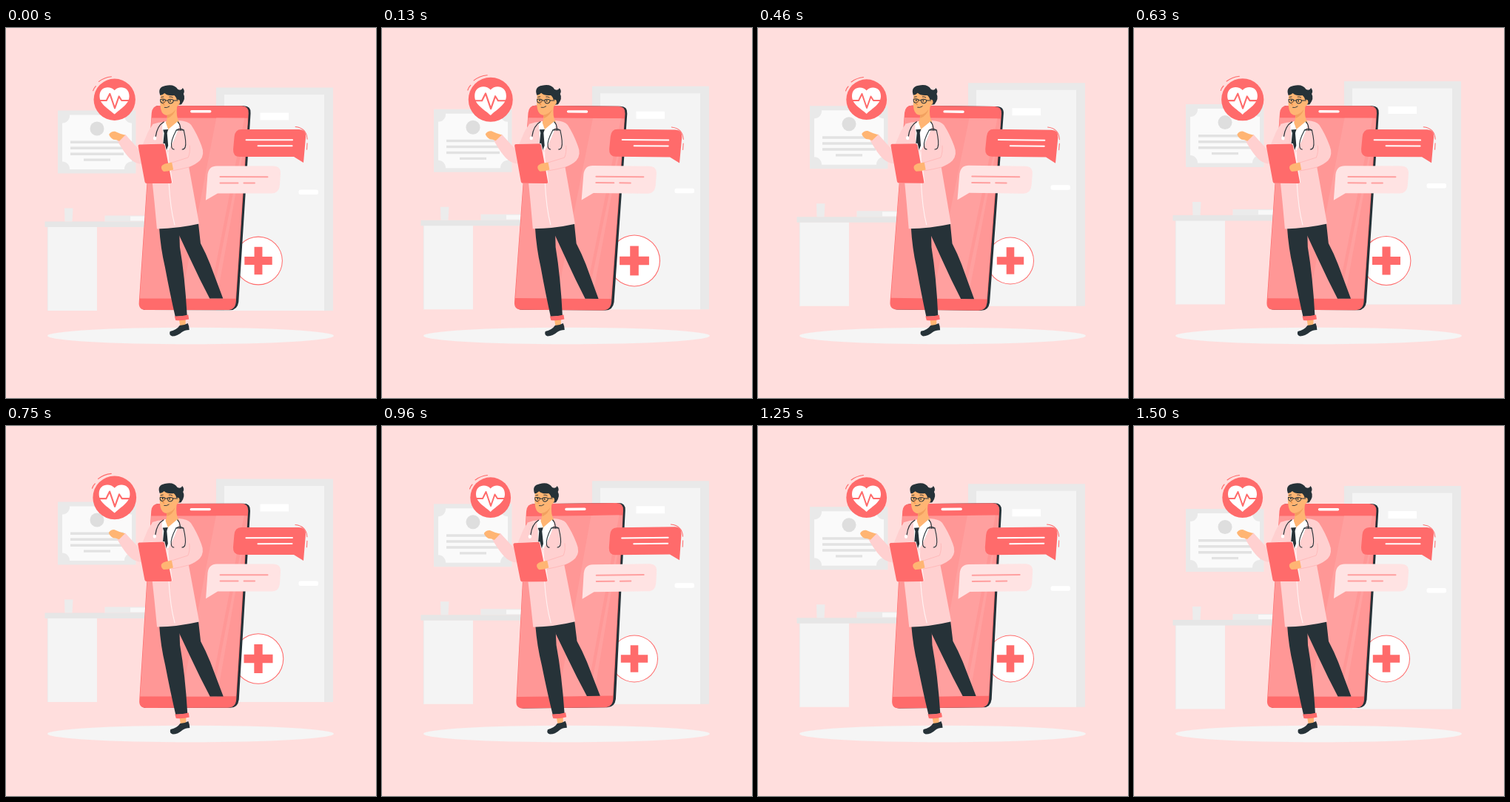
Write an HTML page with a canvas that moves like this. It is 500x500 px and loops after 1.54 s.

```html
<!DOCTYPE html>
<html lang="en">
<head>
<meta charset="utf-8">
<title>Online doctor</title>
<style>
  html, body { margin: 0; width: 100%; height: 100%; overflow: hidden; background: #ffdedd; }
  canvas { display: block; width: 100vw; height: 100vh; }
</style>
</head>
<body>
<canvas id="stage"></canvas>
<script>
const SIZE = 500, LOOP = 1540, CYCLE = 1500, STEP = 1000 / 24;
const RED = '#ff6b6b', DARK = '#263238', SKIN = '#ffb573', COAT = '#ffd0d0';
const GREY = '#e9e9e9', PALE = '#f4f4f4', WHITE = '#fff';

const canvas = document.getElementById('stage');
const ctx = canvas.getContext('2d');
const density = window.devicePixelRatio || 1;
canvas.width = canvas.height = SIZE * density;

function fill(d, color) {
  ctx.fillStyle = color;
  ctx.fill(new Path2D(d));
}

function line(d, color, width = 1) {
  ctx.strokeStyle = color;
  ctx.lineWidth = width;
  ctx.lineCap = ctx.lineJoin = 'round';
  ctx.stroke(new Path2D(d));
}

function rect(x, y, w, h, color, radius = 0) {
  ctx.fillStyle = color;
  ctx.beginPath();
  ctx.roundRect(x, y, w, h, radius);
  ctx.fill();
}

function oval(x, y, rx, ry, color) {
  ctx.fillStyle = color;
  ctx.beginPath();
  ctx.ellipse(x, y, rx, ry, 0, 0, Math.PI * 2);
  ctx.fill();
}

// Piecewise linear track of [position, value] stops.
function track(stops, p) {
  const i = Math.max(1, stops.findIndex(([at]) => at >= p));
  const [a, from] = stops[i - 1], [b, to] = stops[i];
  return from + (to - from) * (p - a) / (b - a);
}

const FLOAT = [[0, 0], [0.5, -10], [1, 0]];
const SWAY = [[0, 0], [0.25, 1], [0.75, -1], [1, 0]];
const BEAT = [[0, 1], [0.1, 1.1], [0.3, 1], [0.4, 1], [0.5, 1.1], [0.6, 1], [1, 1]];

function group(draw, { x = 0, y = 0, dy = 0, angle = 0, scale = 1 }) {
  ctx.save();
  ctx.translate(x, y + dy);
  ctx.rotate(angle * Math.PI / 180);
  ctx.scale(scale, scale);
  ctx.translate(-x, -y);
  draw();
  ctx.restore();
}

function furniture() {
  // Door
  rect(284, 81, 158, 301.5, GREY);
  rect(295, 90.5, 135, 292, PALE);
  rect(343.5, 115, 38.5, 10, WHITE, 0.5);
  rect(395.5, 219, 26.5, 6.5, WHITE, 2.5);

  // Certificate
  rect(70, 112, 105.5, 85, GREY);
  fill('M86 118H160A10 10 0 0 0 170 129V181A10 10 0 0 0 160 191.500H86A10 10 0 0 0 76 181V129A10 10 0 0 0 86 118Z', '#fafafa');
  oval(123, 136.5, 9.5, 9.5, '#dedede');
  for (let i = 0; i < 3; i++) rect(87, 153 + i * 8, 72, 3.5, '#e2e2e2');
  rect(105, 177, 36, 3.2, '#e2e2e2');

  // Desk
  rect(56, 269, 67, 113.5, PALE);
  rect(56, 269, 1, 113.5, '#ededed');
  rect(52.5, 262, 147, 7.5, '#e6e6e6');
  fill('M79 244H90.500L89.500 262H79.500Z', '#ececec');
  rect(133.5, 254, 66, 8, '#ebebeb');
  rect(168, 255, 32, 6, '#f8f8f8');
}

function medicalCross() {
  oval(341, 314.5, 32, 32, RED);
  oval(341, 314.5, 31, 31, WHITE);
  rect(322.8, 309.2, 36.4, 10.6, RED);
  rect(335.7, 296.3, 10.6, 36.4, RED);
}

function phone() {
  const body = 'M206 105H320Q330 105 329.300 115L313.500 370Q312 381 302 381H189Q179 381 180 370L196.500 115Q197.500 105 206 105Z';
  ctx.save();
  ctx.translate(1, 0);
  fill(body, DARK);
  ctx.restore();
  fill('M206 105H318Q328 105 327.500 115L311 370Q310 381 299 381H189Q179 381 180 370L196.500 115Q197.500 105 206 105Z', RED);
  fill('M196.500 121.500H326.500L310.700 365.500H181Z', '#ff9796');
  fill('M284 121.500H322L275 365.500H237Z', '#ffa09f');
  fill('M326.400 123L325.500 138L285 365.500H279Z', '#ffa09f');
  line('M250.500 112.700H275.500', WHITE, 3.4);
}

function legs() {
  fill('M232 268L260 264L263 291Q270 304 276 319L293.500 365.500H275.500Q262 340 250 314L234 280Z', DARK);
  fill('M234 393H243L243 403L236 405Z', SKIN);
  fill('M207 269L234 266L235 296Q242 336 245 389L229 390Q222 360 215 323Q209 298 207 269Z', DARK);
  fill('M228 389.500Q237 390 246.500 387.500L247.500 393.500Q239 396 229.500 395Z', RED);
  fill('M222 410Q231 408 235 402Q241 402 246 399Q248 403 248 408Q242 408 238 411Q232 416.500 225 416.500Q220 415 222 410Z', DARK);
}

function head() {
  fill('M217 112L231 104Q229 121 234 127Q228 137 219 138Q213 135 214 130Q219 126 217 112Z', SKIN);
  fill('M209 87Q207 101 209 110Q211 118 218 118Q227 117 231 106L237 101L236 86Z', SKIN);
  fill('M217.500 117.500Q224 117 229 110Q226 119 218 122Z', '#f2a05f');
  fill('M208 91Q204 80 215 78Q227 75 232 83Q237 85 238.500 81Q242 85 239.500 89Q243 95 237 103Q232 105 230.500 100Q231 94 227 91Q218 92 214 88Q211 91 208 91Z', DARK);
  oval(232, 100, 2.8, 3.3, SKIN);
  line('M208.500 96.500Q208 101 211.500 101.500Q215 101 215 97Q212 95.500 208.500 96.500M219 97Q218 101.500 222 102Q226 101.500 226 97.500Q222 95.500 219 97M215 98H219M226 98H232', DARK, 1);
  oval(212, 98, 0.9, 1.2, DARK);
  oval(221.5, 98.5, 0.9, 1.2, DARK);
  line('M209.500 93.500L212.500 93M220.500 93Q223 92.500 225 94M214 107.500Q217 108.500 220.500 106', DARK, 0.9);
  line('M214.500 99L212 103.500L214 104', '#ed893e', 0.9);
}

function coat() {
  // Raised arm
  fill('M199 130Q193 136 189 147L181 166L161 144L150 152Q164 177 174 181.500Q185 187 194 180Z', COAT);
  fill('M139 144Q142 139.500 147 140Q153 143 161 145L153 153Q149 151 145 151Q140 148 139 144Z', SKIN);

  // Torso, skirt and bent arm
  fill('M198 130Q206 127 214 127L234 125Q246 126 250 131Q258 143 264 159Q269 171 262 179Q257 184 247 188Q253 220 261 264.500Q233 271 204 271.500Q201 238 197 202L188 160Z', COAT);
  fill('M212 129L216 126Q219 137 231 125L234 130Q232 143 219 166L212 157Z', WHITE);
}

function upperBody() {
  coat();
  head();
  fill('M211 130L215 126L219 137L211 138ZM219 137L232 126L234 132L222 140Z', WHITE);
  fill('M212 137.500L219 137L217.500 142L219 159L216 167L212 158L213.500 142Z', DARK);
  line('M219 167L220 209Q222 244 228 266', '#fff3f3', 1.1);
  line('M248 159Q249 168 246 175L224 182M247 188Q236 191 224 193', '#ffb5b5', 0.8);

  // Stethoscope
  line('M213 127Q204 132 202 147M232 127Q236 131 235.500 138', DARK, 1.2);
  oval(201, 149, 2.2, 2.6, WHITE);
  line('M230 138Q222 153 223.500 160Q224 164 227 164M240 138Q244 155 242 161Q241 164 238 164', DARK, 1.1);
  line('M230 138Q235 134.500 240 138Z', DARK, 1);

  // Clipboard with the holding hand
  fill('M181 157.500L214.500 156Q222 183 225 209L190 210Z', '#fff0f0');
  fill('M180 157.500L212 156.500Q214 156.500 214.500 159L224 208.500Q224 210 222 210H190Q188 210 187.500 208L178.500 160Q178 158 180 157.500Z', RED);
  fill('M210 187Q212 184 217 183L224 181.500L226 191.500Q220 194 213 194Q209 191 210 187Z', SKIN);
}

function doctorAndPhone() {
  phone();
  legs();
  upperBody();
}

function bubbles() {
  fill('M318 137H396Q405.500 137 405 147L402 182L389 174H316Q306.500 174 307 164L308.500 147Q309.500 137 318 137Z', RED);
  line('M324.500 151.200H387M340.500 159.200H386.500', WHITE, 2);
  line('M391 133.500Q406 135 407 150M407 155.500L406.500 164', RED, 1);
  fill('M285 186.500H361Q371.500 186.500 371 197L370 212Q369 223.500 359 223.500H286L270 233L272.500 198Q274 186.500 285 186.500Z', '#ffe3e3');
  line('M289.500 201.200H353.500M289.500 209.500H313.500M321.500 209.500H336', '#ff9f9f', 2);
}

function heartBadge() {
  oval(146.7, 96.7, 27.4, 27.4, RED);
  fill('M146.700 84.500C152 78 166 79 166 92C166 103 155 108 146.700 116C138 108 127 103 127 92C127 79 141 78 146.700 84.500Z', WHITE);
  line('M126 98H136L140.500 89L147 108L152.500 92.500L156 98H167', RED, 2);
  line('M126 73Q133 67.500 142.500 66.500M118.500 85Q119.500 81.500 122 79', RED, 1.1);
}

function draw(now) {
  const step = Math.floor((now % LOOP + 4) / STEP);
  const p = Math.min((step + 1) * STEP, CYCLE) / CYCLE;
  const angle = track(SWAY, p), scale = track(BEAT, p);

  ctx.setTransform(density, 0, 0, density, 0, 0);
  ctx.fillStyle = '#ffdedd';
  ctx.fillRect(0, 0, SIZE, SIZE);
  group(furniture, { dy: track(FLOAT, p) });
  oval(249.5, 416, 193.5, 11.3, '#f5f5f5');
  group(medicalCross, { x: 341, y: 314.5, scale });
  group(doctorAndPhone, { x: 234.5, y: 247, angle });
  group(bubbles, { x: 340, y: 183, angle });
  group(heartBadge, { x: 146, y: 95.5, scale });
}

const start = performance.now();
function tick() {
  draw(performance.now() - start);
  requestAnimationFrame(tick);
}
tick();
</script>
</body>
</html>
```
